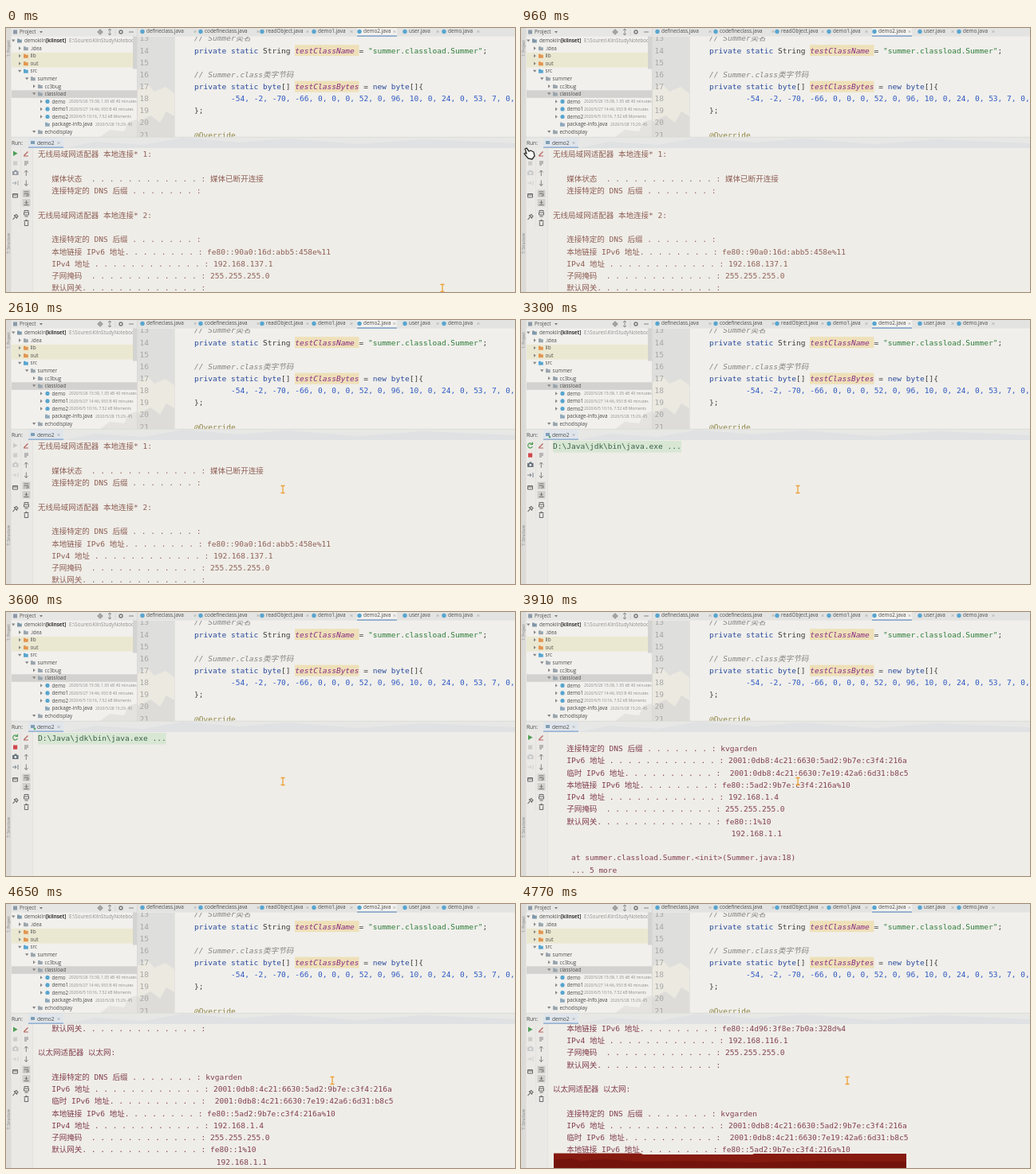
Write an HTML page that moves like this. It is 638 px wide and 332 px high and loops after 4.83 s.

```html
<!DOCTYPE html>
<html lang="en">
<head>
<meta charset="utf-8">
<title>Run console</title>
<style>
  html, body { margin: 0; width: 100%; height: 100%; overflow: hidden; background: #efede8; }
  svg { display: block; }
  text { white-space: pre; }
  .mono { font: 9.54px "DejaVu Sans Mono", "Noto Sans CJK SC", "Noto Sans CJK", monospace; }
  .ui { font-family: "Open Sans", sans-serif; }
</style>
</head>
<body>
<svg id="stage" width="638" height="332" viewBox="0 0 638 332" xmlns="http://www.w3.org/2000/svg">
  <defs>
    <clipPath id="treeClip"><path d="M0 0H164V137H0Z"/></clipPath>
    <clipPath id="editorClip"><path d="M165 11H638V137H165Z"/></clipPath>
    <clipPath id="consoleClip"><path d="M34 151H638V332H34Z"/></clipPath>
  </defs>
</svg>
<script>
const LOOP = 4830, PITCH = 15.27, CHAR = 5.743;
const stage = document.getElementById('stage');

function add(parent, tag, attrs = {}, content) {
  const node = document.createElementNS('http://www.w3.org/2000/svg', tag);
  for (const key in attrs) node.setAttribute(key, attrs[key]);
  if (content !== undefined) node.textContent = content;
  return parent.appendChild(node);
}
const group = (parent, attrs) => add(parent, 'g', attrs);
const rect = (parent, x, y, width, height, fill) => add(parent, 'rect', { x, y, width, height, fill });
const line = (parent, d, stroke, width = 1) =>
  add(parent, 'path', { d, stroke, 'stroke-width': width, fill: 'none' });
const shape = (parent, d, fill) => add(parent, 'path', { d, fill });
const label = (parent, x, y, str, size = 6.3, fill = '#4b4b4b', weight = 400) =>
  add(parent, 'text', { class: 'ui', x, y: y + size * .36, 'font-size': size, 'font-weight': weight, fill }, str);
const mono = (parent, x, y, str, fill) =>
  add(parent, 'text', { class: 'mono', x, y: y + 3.4, fill }, str);
const sideLabel = (y, str) => add(stage, 'text',
  { class: 'ui', 'font-size': 4.8, fill: '#7c7c7c', transform: `translate(4.6 ${y}) rotate(-90)` }, str);
const show = (node, on) => { node.style.display = on ? '' : 'none'; };

rect(stage, 0, 0, 638, 332, '#efede8');

// Project tree
const tree = group(stage, { 'clip-path': 'url(#treeClip)' });
rect(tree, 0, 0, 164, 137, '#f1f0ed');
shape(tree, 'M118 137l12-9 18 2 6-12 10-3v22z', '#e4e3df');
rect(tree, 0, 0, 164, 10.5, '#e6e6e4');
rect(tree, 9, 2.5, 5, 5, '#8b9aa8');
label(tree, 17, 5, 'Project', 6.3);
shape(tree, 'M42 4h4l-2 2.6z', '#777');
add(tree, 'circle', { cx: 118, cy: 5, r: 2.4, fill: 'none', stroke: '#777', 'stroke-width': .8 });
line(tree, 'M118 1.5v7M114.5 5h7M130 1.5v7M128 3l2-2 2 2M128 7l2 2 2-2', '#777', .8);
line(tree, 'M137 2v7', '#ccc', .7);
add(tree, 'circle', { cx: 144, cy: 5, r: 2, fill: 'none', stroke: '#777', 'stroke-width': 1.4 });
line(tree, 'M154 5h6', '#777', .9);
rect(tree, 7, 30.8, 157, 18.8, '#ebe8d1');
rect(tree, 7, 78.3, 157, 9.5, '#d3d2d0');

// [arrow x, open, icon colour, name, note]; arrow -1 marks a plain file
const GREY = '#9aa5ad', ORANGE = '#e3954f', BLUE = '#58a5cf';
const rows = [
  [8, 1, '#7f98aa', '', ''],
  [16, 0, GREY, '.idea'], [16, 0, ORANGE, 'lib'], [16, 0, ORANGE, 'out'], [16, 1, BLUE, 'src'],
  [25, 1, GREY, 'summer'], [34, 0, GREY, 'cc3bug'], [34, 1, GREY, 'classload'],
  [43, 0, BLUE, 'demo', '2020/5/26 15:38, 1.05 kB 40 minutes'],
  [43, 0, BLUE, 'demo1', '2020/5/27 14:46, 953 B 40 minutes'],
  [43, 0, BLUE, 'demo2', '2020/6/5 10:16, 7.52 kB Moments'],
  [-1, 0, '#8fa9bc', 'package-info.java', '2020/5/28 15:29, 45'],
  [34, 1, GREY, 'echodisplay'],
];
rows.forEach(([arrow, open, color, name, note], i) => {
  const y = 16 + i * 9.55, x = arrow < 0 ? 43 : arrow;
  if (arrow >= 0) shape(tree, open ? `M${x - 1} ${y - 1.5}h4.4l-2.2 3z` : `M${x} ${y - 2.2}v4.4l2.8-2.2z`, '#858585');
  if (color === BLUE && x === 43) add(tree, 'circle', { cx: 52, cy: y, r: 2.6, fill: color });
  else shape(tree, `M${x + 6} ${y - 2.4}h2.4l.8 1h2.6v4h-5.8z`, color);
  label(tree, x + 14.5, y, name);
  if (note) label(tree, arrow < 0 ? 112 : 79, y, note, 5, '#8d8d8d');
});
label(tree, 23, 16, 'demokiln', 6.2);
label(tree, 50, 16, '[kilnset]', 6.2, '#333', 700);
label(tree, 79, 16, 'E:\\Soures\\KilnStudyNotebook', 6.2, '#8d8d8d');
rect(tree, 159, 10.5, 5, 41, '#d3d3d1');

// Editor
const editor = group(stage, { 'clip-path': 'url(#editorClip)' });
rect(editor, 165, 11, 473, 126, '#f0efeb');
rect(editor, 165, 11, 46, 126, '#dededc');
shape(editor, 'M165 78l12-8 9 10 14-6 11 8v55h-46z', '#ebe9e0');
shape(editor, 'M165 118l16-8 12 9 8-14 10 6v26h-46z', '#dddcd8');
line(editor, 'M211.5 11V137', '#dfddd8', .7);
const FIELD = '#8a2f86', KEY = '#2b4b9c', PLAIN = '#3c3c3c', NOTE = '#858585', NUM = '#2d57c2';
const code = [
  [13, 236, [NOTE, '// Summer类名']],
  [14, 236, [KEY, 'private static '], [PLAIN, 'String '], [FIELD, 'testClassName'], [PLAIN, ' = '],
    ['#2f7d3a', '"summer.classload.Summer"'], [PLAIN, ';']],
  [16, 236, [NOTE, '// Summer.class类字节码']],
  [17, 236, [KEY, 'private static byte'], [PLAIN, '[] '], [FIELD, 'testClassBytes'], [PLAIN, ' = '],
    [KEY, 'new byte'], [PLAIN, '[]{']],
  [18, 282, [NUM, '-54, -2, -70, -66, 0, 0, 0, 52, 0, 96, 10, 0, 24, 0, 53, 7, 0, 54']],
  [19, 236, [PLAIN, '};']],
  [21, 236, ['#8f8546', '@Override']],
];
const codeY = n => 13 + (n - 13) * 15.15;
rect(editor, 362, codeY(14) - 7, 14 * CHAR, 14, '#eee0b8');
rect(editor, 362, codeY(17) - 7, 14 * CHAR, 14, '#eee0b8');
for (let n = 13; n < 22; n++) mono(editor, 167.5, codeY(n), n, '#a6a6a4');
code.forEach(([n, x, ...tokens]) => {
  const text = mono(editor, x, codeY(n), '', PLAIN);
  tokens.forEach(([fill, str]) =>
    add(text, 'tspan', fill === FIELD || fill === NOTE ? { fill, 'font-style': 'italic' } : { fill }, str));
});

// Editor tabs
rect(stage, 165, 0, 473, 10.5, '#e3e3e1');
rect(stage, 440, 0, 50, 10.5, '#f2f1ee');
rect(stage, 440, 9.3, 50, 1.5, '#7d9fc6');
[[171, 'defineclass', 237], [244, 'codefineclass', 316], [321, 'readObject', 378], [386, 'demo1', 433],
 [443, 'demo2', 487], [500, 'user', 541], [549, 'demo', 592]].forEach(([x, name, close]) => {
  add(stage, 'circle', { cx: x, cy: 4.5, r: 2.7, fill: BLUE });
  label(stage, x + 5, 4, name + '.java', 6.4);
  line(stage, `M${close - 1.5} 3l3 3m0-3l-3 3`, '#999', .6);
});
line(stage, 'M164.5 0V137', '#d5d4d0', .8);

// Run header and toolbar
rect(stage, 0, 137, 638, 14, '#e7e7e5');
shape(stage, 'M72 151l40-8 60 4 50-9 70 6 60-5 90 7 80-6 116 5v6z', '#dfe1e3');
line(stage, 'M0 137.3H638', '#d9d7d2', .7);
label(stage, 7, 144.5, 'Run:', 6.6);
rect(stage, 28, 138, 44, 12.5, '#dfe5eb');
rect(stage, 28, 149.4, 44, 1.5, '#8fadd0');
rect(stage, 31, 142, 5, 4, '#7f9fb5');
const liveDot = add(stage, 'circle', { cx: 36, cy: 147, r: 1.3, fill: '#4faa5c' });
label(stage, 39, 144.5, 'demo2', 6.6);
line(stage, 'M64.5 143l3 3m0-3l-3 3', '#999', .6);
rect(stage, 0, 151, 34, 181, '#ebe9e6');
rect(stage, 0, 0, 6.5, 332, '#dcdbd8');
sideLabel(36, '1: Project');
sideLabel(284, '7: Structure');
line(stage, 'M18.5 152V250M33.5 151V332', '#dfddd8', .6);

const play = shape(stage, 'M9 154.5v6.6l5.6-3.3z', '#4f9f57');
const rerun = line(stage, 'M14 156a3 3 0 1 0 .4 3M14.5 153.5v3h-3', '#4f9f57', 1.2);
const stop = rect(stage, 9, 167.5, 5.2, 5.2, '#c9c8c5');
const camera = group(stage);
shape(camera, 'M8 180h2l1-1.4h2l1 1.4h1.6v5H8z', '#68747d');
add(camera, 'circle', { cx: 11.8, cy: 182.4, r: 1.4, fill: '#eee' });
line(camera, 'M8 195h5m-2-2l2 2-2 2M15 192v6', '#68747d', .9);
line(stage, 'M8.5 208.5h6v4.5h-6zM8.5 210h6', '#666', 1);
line(stage, 'M8.5 241l2.6-2.8M10 235.5l4 4M11 236l2-1.5 2 2.2-1.7 2', '#666', 1.1);
line(stage, 'M22.5 160.5l5-5M22 161h6', '#b4625c', 1.2);
line(stage, 'M23 168h5M23 170h5M23 172h3M25.3 186v-7m-2.3 2.5l2.3-2.5 2.3 2.5M25.3 191.5v7m-2.3-2.5l2.3 2.5 2.3-2.5', '#777', .9);
rect(stage, 20.5, 203.5, 10, 9.5, '#d0cfcc');
rect(stage, 20.5, 215, 10, 9.5, '#d0cfcc');
line(stage, 'M22.5 206h6M22.5 208.5h5.5v2.5h-3M22.5 211h1M25.5 217v4m-2-2l2 2 2-2M22.5 222.5h6', '#666', .9);
line(stage, 'M23 231.5v-2h5v2M22.5 232h6v3h-6zM23.5 237h4', '#666', 1);
line(stage, 'M22.5 242.5h6M24.5 241.3h2M23.3 243.5v5h4.4v-5', '#666', 1);

// Console
const view = group(stage, { 'clip-path': 'url(#consoleClip)' });
const dots = n => '. '.repeat(n) + ': ';
const suffix = v => '   连接特定的 DNS 后缀 ' + dots(7) + v;
const local = v => '   本地链接 IPv6 地址' + dots(8) + v;
const ipv4 = v => '   IPv4 地址 ' + dots(12) + v;
const mask = '   子网掩码  ' + dots(12) + '255.255.255.0';
const gateway = v => '   默认网关' + dots(13) + v;

const before = [
  '无线局域网适配器 本地连接* 1:', '', '   媒体状态  ' + dots(12) + '媒体已断开连接', suffix(''), '',
  '无线局域网适配器 本地连接* 2:', '', suffix(''), local('fe80::90a0:16d:abb5:458e%11'),
  ipv4('192.168.137.1'), mask, gateway(''),
];
const after = [
  local('fe80::4d96:3f8e:7b0a:328d%4'), ipv4('192.168.116.1'), mask, gateway(''), '',
  '以太网适配器 以太网:', '', suffix('kvgarden'),
  '   IPv6 地址 ' + dots(12) + '2001:0db8:4c21:6630:5ad2:9b7e:c3f4:216a',
  '   临时 IPv6 地址' + dots(10) + ' 2001:0db8:4c21:6630:7e19:42a6:6d31:b8c5',
  local('fe80::5ad2:9b7e:c3f4:216a%10'), ipv4('192.168.1.4'), mask, gateway('fe80::1%10'),
  ' '.repeat(39) + '192.168.1.1', '',
  '    at summer.classload.Summer.<init>(Summer.java:18)', '    ... 5 more', '',
  'Process finished with exit code 0',
];
function listing(lines, top, color) {
  const g = group(view);
  lines.forEach((str, i) => str && mono(g, 40, top + i * PITCH, str, str.startsWith('Process') ? '#3a3a8e' : color));
  return g;
}
const oldRun = listing(before, 159, '#8d5f55');
const newRun = listing(after, 156.4 - 8 * PITCH, '#803f4c');
const command = group(view);
rect(command, 40, 152, 161, 14.5, '#d8e7d3');
mono(command, 40, 159, 'D:\\Java\\jdk\\bin\\java.exe ...', '#37604a');
const caret = rect(view, 40, 213, 1, 14, '#444');
const band = group(view);
shape(band, 'M41 313.5H150l3 1.5H290l2-1H483V332H41Z', '#851a10');
shape(band, 'M41 322l20-2 14 3 30-2 45 3 60-1 80 2 90-2 103 1V332H41Z', '#74130b');

// Mouse
const beam = line(stage, 'M-2.5-4.5h5M0-4.5v9M-2.5 4.5h5', '#eba23a', 1.3);
const hand = group(stage);
add(hand, 'path', {
  d: 'M-4-6l2-1 3 4 2-1 4 2 1 5-3 4-5-1-5-6 2-1 1 1z',
  fill: '#f8f8f6', stroke: '#2b2b2b', 'stroke-width': 1.3, 'stroke-linejoin': 'round'
});

const path = [
  [0, 547, 327], [540, 50, 213], [600, 48, 210], [840, 9, 158], [1140, 9, 158], [1560, 78.5, 182],
  [1880, 78.5, 182], [2100, 235, 211], [2220, 300, 211], [2360, 338, 219], [2420, 340, 219],
  [2580, 347, 213], [4090, 347, 213], [4440, 409, 222], [LOOP, 409, 222],
];
const scrolls = [[0, 2], [4090, 0], [4530, 2], [4600, 3], [4650, 5], [4710, 6], [4770, 8]];

function mouseAt(t) {
  const i = path.findIndex(p => p[0] > t);
  const [a, b] = [path[i - 1], path[i]], k = (t - a[0]) / (b[0] - a[0]);
  return [a[1] + (b[1] - a[1]) * k, a[2] + (b[2] - a[2]) * k];
}

function draw(t) {
  const running = t >= 3300 && t < 3850, idle = t < 900, printed = t >= 3780;
  show(oldRun, t < 3300);
  show(command, t >= 3300 && !printed);
  show(newRun, printed);
  const scroll = scrolls.filter(s => s[0] <= t).pop()[1];
  newRun.setAttribute('transform', `translate(0 ${scroll * PITCH})`);
  show(caret, (t >= 2000 && t < 2520) || (t >= 3050 && t < 3300));
  show(band, t >= 4770);

  show(play, !running);
  show(rerun, running);
  show(liveDot, running);
  play.setAttribute('fill', idle || printed ? '#4f9f57' : '#cbcac6');
  stop.setAttribute('fill', running ? '#d0474e' : '#cfcdc9');
  camera.style.opacity = running ? 1 : idle ? .65 : .25;

  const [x, y] = mouseAt(Math.floor(t / 60) * 60);
  const overTools = x < 34;
  show(beam, !overTools);
  show(hand, overTools);
  (overTools ? hand : beam).setAttribute('transform', `translate(${x} ${y})`);
}

function tick() {
  draw(performance.now() % LOOP);
  requestAnimationFrame(tick);
}
tick();
</script>
</body>
</html>
```
